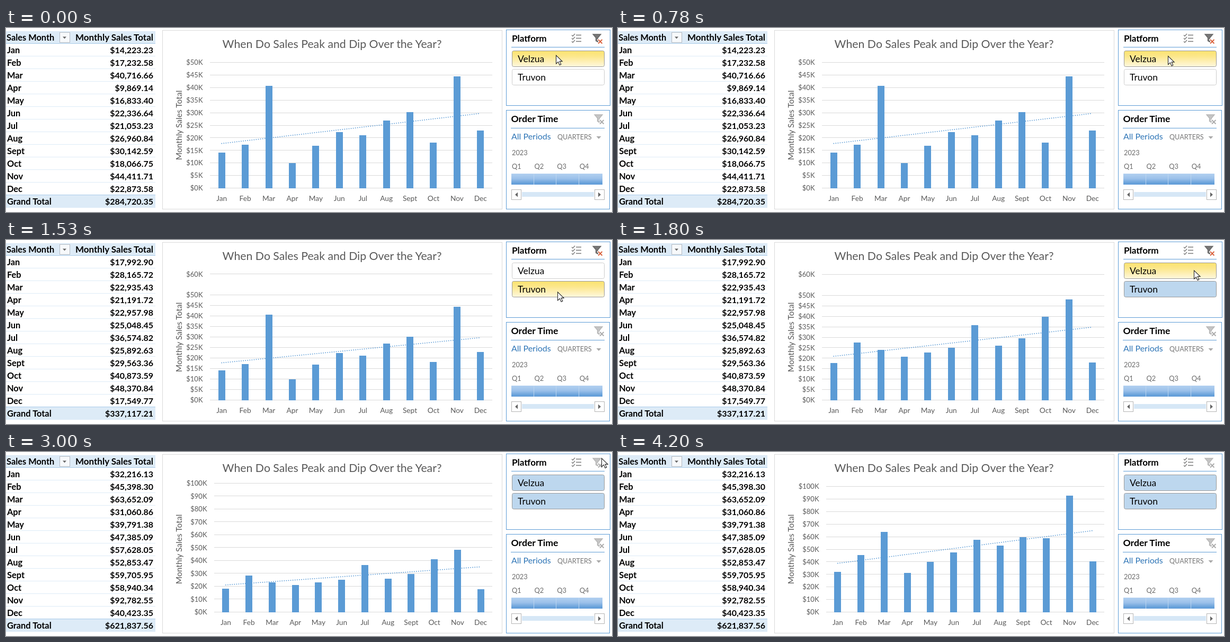
Recreate the animation shown at these times as an HTML page. Size 1144 px wide and 350 px high, loop 4230 ms.

```html
<!DOCTYPE html>
<html lang="en">
<head>
<meta charset="utf-8">
<title>Sales dashboard</title>
<style>
html, body { margin: 0; width: 100%; height: 100%; overflow: hidden; background: #fff; }
svg { display: block; width: 1144px; height: 350px; font-family: Lato, Carlito, sans-serif; }
</style>
</head>
<body>
<svg viewBox="0 0 1144 350">
  <defs>
    <linearGradient id="hover" x2="0" y2="1">
      <stop offset="0" stop-color="#fbe36f"/><stop offset=".35" stop-color="#fce78c"/><stop offset="1" stop-color="#fff8de"/>
    </linearGradient>
    <linearGradient id="period" x2="0" y2="1">
      <stop offset="0" stop-color="#b2d0f0"/><stop offset=".45" stop-color="#9cc1ea"/>
      <stop offset=".9" stop-color="#619dd8"/><stop offset="1" stop-color="#6da4dc"/>
    </linearGradient>
  </defs>
  <g id="still"></g>
  <g id="live"></g>
</svg>
<script>
const LOOP = 4230, PICK = 1260, CLEAR = 3000;
const BASE = 304.5, PLOT = 239, RIGHT = 918, BLUE = '#5b9bd5';
const MONTHS = 'Jan Feb Mar Apr May Jun Jul Aug Sept Oct Nov Dec'.split(' ');
const STORES = ['Velzua', 'Truvon'];
const first = [14223.23, 17232.58, 40716.66, 9869.14, 16833.40, 22336.64,
  21053.23, 26960.84, 30142.59, 18066.75, 44411.71, 22873.58];
const second = [17992.90, 28165.72, 22935.43, 21191.72, 22957.98, 25048.45,
  36574.82, 25892.63, 29563.36, 40873.59, 48370.84, 17549.77];
const both = first.map((v, i) => v + second[i]);
// time, x, y of the pointer
const PATH = [[0, 1038.5, 52], [700, 1038.5, 53.5], [900, 1038.5, 53.5], [1180, 1041.5, 99], [1560, 1041.5, 99],
  [1800, 1087.5, 58], [2200, 1124.5, 12], [3020, 1124.5, 12], [3210, 1129, -24], [LOOP, 1129, -24]];

const lerp = (a, b, p) => a + (b - a) * p;
const clamp = p => Math.min(1, Math.max(0, p));
const easeOut = p => 1 - (1 - clamp(p)) ** 3;
const smooth = p => p * p * (3 - 2 * p);
const sum = list => list.reduce((a, b) => a + b, 0);
const money = v => '$' + v.toLocaleString('en-US', { minimumFractionDigits: 2, maximumFractionDigits: 2 });

const text = (x, y, s, size, fill = '#000', more = '') =>
  `<text x="${x}" y="${y}" font-size="${size}" fill="${fill}" ${more}>${s}</text>`;
const rect = (x, y, w, h, fill, stroke = 'none', rx = 0) =>
  `<rect x="${x}" y="${y}" width="${w}" height="${h}" fill="${fill}" stroke="${stroke}" rx="${rx}"/>`;
const path = (d, stroke, width = 1, fill = 'none', more = '') =>
  `<path d="${d}" stroke="${stroke}" stroke-width="${width}" fill="${fill}" ${more}/>`;
const BOLD = 'font-weight="700"', END = 'text-anchor="end"', MID = 'text-anchor="middle"';

function filterIcon(x, y, on) {
  return path(`M${x} ${y}h15l-5.5 6.5v8.5l-4-2.5v-6z`, on ? '#666' : '#b5b5b5', 1.3, on ? '#777' : '#c4c4c4')
    + path(`M${x + 9} ${y + 9}l9 9m0 -9l-9 9`, '#fff', 4)
    + path(`M${x + 10} ${y + 10}l7.5 7.5m0 -7.5l-7.5 7.5`, on ? '#d9603b' : '#aaa', 1.8);
}

function drawStill() {
  let s = rect(0, 6, 282, 24, '#ddebf7') + rect(0, 318, 282, 24, '#ddebf7');
  for (let y = 53.5; y < 310; y += 24) s += path(`M0 ${y}H282`, '#ddebf7');
  s += path('M0 29.5H282M0 317.5H282', '#a9cbe9');
  s += text(1, 24, 'Sales Month', 16.4, '#000', BOLD) + text(278, 24, 'Monthly Sales Total', 17, '#000', BOLD + END);
  [...MONTHS, 'Grand Total'].forEach((m, i) => s += text(2, 48 + i * 24, m, 16.4, '#000', BOLD));
  s += rect(101.5, 8.5, 19, 19, '#f7f9fb', '#b3b9c0') + path('M107 16.5h7l-3.5 4z', 'none', 0, '#666');

  s += rect(295.5, 4.5, 641, 340, '#fff', '#d9d9d9');
  s += text(615.5, 38, 'When Do Sales Peak and Dip Over the Year?', 21.25, '#595959', MID);
  s += text(0, 0, 'Monthly Sales Total', 15.6, '#595959', MID + ' transform="translate(331.5 185) rotate(-90)"');

  s += rect(944.5, 3.5, 196, 144, '#fff', BLUE) + rect(944.5, 156.5, 195, 188, '#fff', BLUE);
  s += path('M954 36.5H1130M953 190.5H1130', BLUE);
  s += text(955, 26, 'Platform', 17.1, '#000', BOLD) + text(953.5, 179, 'Order Time', 17.6, '#000', BOLD);
  for (const y of [13.5, 19.5, 25.5])
    s += path(`M1068 ${y}l2 2l4 -4.5M1076 ${y}h10`, '#777', 1.3);
  s += filterIcon(1111, 165, false);
  s += text(954, 212, 'All Periods', 16, '#2e75b6') + text(1041, 212, 'QUARTERS', 12.6, '#777');
  s += path('M1114.5 206h9l-4.5 5z', 'none', 0, '#aaa');
  s += text(955, 242, '2023', 12.8, '#6b6b6b');
  ['Q1', 'Q2', 'Q3', 'Q4'].forEach((q, i) => s += text(955 + i * 42.6, 268, q, 12.8, '#6b6b6b'));
  s += rect(954, 277, 172, 21, 'url(#period)') + path('M996.5 277v21M1038.5 277v21M1081.5 277v21', '#bcd5f0');
  s += rect(974, 312, 136, 9, '#d6e7f6');
  s += rect(954.5, 307.5, 18, 19, '#fff', '#b4b4b4') + rect(1111.5, 307.5, 18, 19, '#fff', '#b4b4b4');
  return s + path('M966 312.5v9l-5 -4.5zM1118 312.5v9l5 -4.5z', 'none', 0, '#666');
}

function drawChart(t) {
  const wide = t >= CLEAR, changed = t >= PICK;
  const start = wide ? 2793 : 1293;
  const oldMax = wide ? 60 : 50, max = wide ? 100 : changed ? 60 : 50;
  const zoom = changed ? easeOut((t - start) / 314) : 1;
  const grow = changed ? easeOut((t - start - 314) / 310) : 1;
  const unit = lerp(PLOT / oldMax, PLOT / max, changed ? zoom : 0);
  const from = wide ? second : first, to = wide ? both : changed ? second : first;
  const values = from.map((v, i) => lerp(v, to[i], grow) / 1000);
  const left = wide ? 393 : 385, slot = (RIGHT - left) / 12;
  const centre = i => left + slot * (i + .5);
  const fine = t < start + 628 && !wide;
  let s = '';

  for (let k = 0; k <= max; k += fine ? 5 : 10) {
    if (k === 55) continue;
    const y = BASE - k * unit;
    s += path(`M${left} ${Math.round(y - .5) + .5}H${RIGHT}`, '#d9d9d9');
    s += text(left - 13.5, y + 4.7, `$${k}K`, 13, '#595959', END);
  }
  values.forEach((v, i) => {
    const top = Math.round(BASE - v * unit);
    s += rect(Math.round(centre(i) - 6.5), top, 13, 305 - top, BLUE);
    s += text(centre(i), 329, MONTHS[i], 13.7, '#595959', MID);
  });

  const mean = sum(values) / 12;
  const slope = sum(values.map((v, i) => (i - 5.5) * v)) / 143;
  const trend = i => `${centre(i)} ${BASE - (mean + slope * (i - 5.5)) * unit}`;
  return s + path(`M${trend(0)}L${trend(11)}`, BLUE, 1.8, 'none', 'stroke-linecap="round" stroke-dasharray=".1 4"');
}

function pointer(t) {
  const n = PATH.findIndex(p => p[0] > t), [t0, x0, y0] = PATH[n - 1], [t1, x1, y1] = PATH[n];
  const p = smooth((t - t0) / (t1 - t0));
  return [lerp(x0, x1, p), lerp(y0, y1, p)];
}

function drawLive(t) {
  const data = t < PICK ? first : t < CLEAR ? second : both;
  const [x, y] = pointer(t);
  let s = drawChart(t);
  [...data, sum(data)].forEach((v, i) => s += text(278, 48 + i * 24, money(v), 16, '#000', BOLD + END));
  STORES.forEach((name, i) => {
    const top = 43.5 + i * 35;
    const on = data === both || data === [first, second][i];
    const over = x < 1130 && y > top && y < top + 30;
    s += rect(955.5, top, 174, 30, over ? 'url(#hover)' : on ? '#bdd7ee' : '#fff', over || on ? '#999' : '#ccc', 3);
    s += text(966, top + 21.5, name, 17.5);
  });
  s += filterIcon(1108, 12, t < CLEAR);
  return s + path(`M${x} ${y}v16l3.9 -3.6l2.7 6.1l2.7 -1.2l-2.7 -5.9h5z`, '#222', 1.1, '#fff');
}

const live = document.getElementById('live');
document.getElementById('still').innerHTML = drawStill();
function tick() {
  live.innerHTML = drawLive(performance.now() % LOOP);
  requestAnimationFrame(tick);
}
tick();
</script>
</body>
</html>
```
